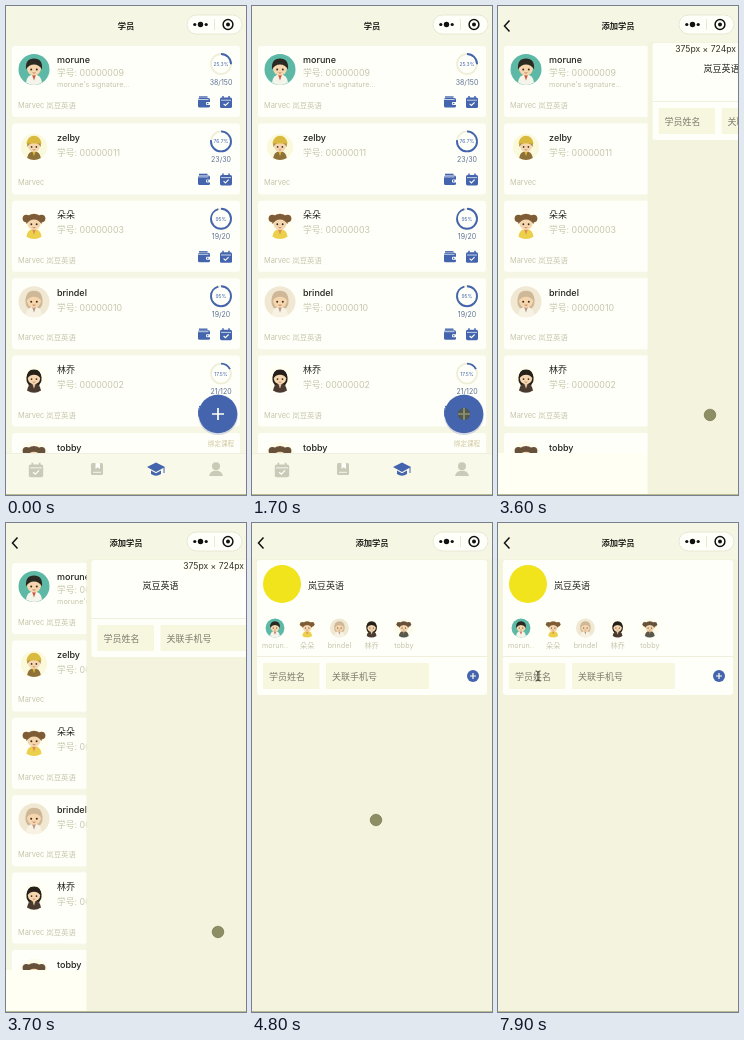
Write an HTML page that moves like this. It is 240 by 489 pixels and loops after 8 s.

```html
<!DOCTYPE html>
<html lang="zh">
<head>
<meta charset="utf-8">
<title>学员</title>
<style>
html, body { margin: 0; width: 100%; height: 100%; overflow: hidden; background: #f6f6e4; }
svg { display: block; width: 100%; height: 100%; }
text { font-family: Inter, "Noto Sans CJK SC", "Noto Sans CJK", sans-serif; dominant-baseline: central; }
</style>
</head>
<body>
<svg id="stage" viewBox="0 0 240 489"></svg>
<script>
const LOOP = 8000, STEP = 100;
const BLUE = '#4465ae', INK = '#24241e', PALE = '#c6c6ac', CARD = '#fffffa', PAGE = '#f6f6e4';
const SCHOOL = '岚豆英语', TUTOR = 'Marvec';

const rect = (x, y, w, h, fill, rx = 0, more = '') =>
  `<rect x="${x}" y="${y}" width="${w}" height="${h}" rx="${rx}" fill="${fill}" ${more}/>`;
const dot = (x, y, r, fill, more = '') => `<circle cx="${x}" cy="${y}" r="${r}" fill="${fill}" ${more}/>`;
const line = (d, stroke, w = 1, more = '') =>
  `<path d="${d}" fill="none" stroke="${stroke}" stroke-width="${w}" ${more}/>`;
const shape = (d, fill) => `<path d="${d}" fill="${fill}"/>`;
const text = (x, y, s, size, fill, more = '') =>
  `<text x="${x}" y="${y}" font-size="${size}" fill="${fill}" ${more}>${s}</text>`;
const mid = 'text-anchor="middle"';
const group = (id, body, more = '') => `<g id="${id}" ${more}>${body}</g>`;
const at = (x, y, body, k = 1) => `<g transform="translate(${x} ${y}) scale(${k})">${body}</g>`;

const students = [
  { name: 'morune', id: 9, pct: 25.3, left: '38/150', school: true, note: true,
    bg: '#5db9a6', hair: '#2b2a22', body: '#f4f4ea', trim: '#d0573c', k: 1 },
  { name: 'zelby', id: 11, pct: 76.7, left: '23/30',
    bg: '#fbf9dc', hair: '#b08a3c', body: '#8d7138', trim: '#d9b93e', k: .85, hat: true },
  { name: '朵朵', id: 3, pct: 95, left: '19/20', school: true,
    bg: '#fffff4', hair: '#7d5c36', body: '#ecd04c', trim: '#d98b5a', k: .95, buns: true },
  { name: 'brindel', id: 10, pct: 95, left: '19/20', school: true,
    bg: '#f0e8d2', hair: '#cfb898', body: '#f8f2e4', trim: '#b99a86', k: 1, long: true },
  { name: '林乔', id: 2, pct: 17.5, left: '21/120', school: true,
    bg: '#fffff4', hair: '#262019', body: '#4b3a30', trim: '#e0c49c', k: .88, long: true },
  { name: 'tobby', bg: '#fdfbea', hair: '#67513a', body: '#55584c', trim: '#c07050', k: .95, buns: true }
];

function avatar(s) {
  return dot(0, 0, 15.5, s.bg) +
    (s.buns ? dot(-8, -6, 4, s.hair) + dot(8, -6, 4, s.hair) : '') +
    (s.long ? rect(-8.5, -9, 17, 17, s.hair, 7) : '') +
    shape('M-8 13Q-7 5 0 5Q7 5 8 13Q0 18 -8 13Z', s.body) +
    shape('M-2 5L0 11L2 5Z', s.trim) +
    dot(0, -1, 7, '#f6d6ae') +
    shape('M-8 0Q-9 -11 0 -11Q9 -11 8 0Q5 -5 0 -5Q-5 -5 -8 0Z', s.hair) +
    (s.hat ? shape('M-9 -4Q-7 -13 0 -13Q7 -13 9 -4Z', s.trim) : '') +
    dot(-2.8, 0, 1, '#38301f') + dot(2.8, 0, 1, '#38301f') +
    line('M-1.4 3.2Q0 4.2 1.4 3.2', '#a85f42', .7);
}

function ring(y, pct) {
  const len = 2 * Math.PI * 10, arc = len * pct / 100;
  return dot(215, y, 10, 'none', 'stroke="#efefd8" stroke-width="1.8"') +
    dot(215, y, 10, 'none', `stroke="${BLUE}" stroke-width="1.9" stroke-dasharray="${arc} ${len}" transform="rotate(-90 215 ${y})"`) +
    text(215, y, pct + '%', 5, BLUE, mid);
}

const wallet = rect(-6, -4, 12, 9.5, BLUE, 1.5) + line('M-5 -5L3.5 -5', BLUE, 1.4) +
  line('M-6 -2.5H4.5', CARD, .7) + rect(2, 0, 4.5, 3, CARD, 1) + dot(3.7, 1.5, .8, BLUE);
const calendar = c => rect(-6, -4.5, 12, 10.5, c, 1.6) + line('M-3 -6V-3M3 -6V-3', c, 1.5) +
  line('M-5 -1.8H5', CARD, .7) + line('M-2.4 1.8L-.6 3.5L2.6 .3', CARD, 1.1);
const plus = (x, y, r, w) => line(`M${x - r} ${y}H${x + r}M${x} ${y - r}V${y + r}`, '#fffff6', w);

function studentCard(s, i) {
  const y = 40 + 77.4 * i, nameY = y + (i ? 14 : 13.5);
  let out = rect(6, y, 228, 71, CARD, 3) + at(28, y + 23.5, avatar(s), s.k) +
    text(51, nameY, s.name, 9, INK, 'font-weight="500"');
  if (!s.id) return out + text(215, y + 11, '绑定课程', 6.6, '#cfc79c', mid);
  out += text(51, y + (s.note ? 26.5 : 29), '学号: ' + String(s.id).padStart(8, '0'), 8.8, PALE) +
    text(12, y + 59.5, s.school ? `${TUTOR} ${SCHOOL}` : TUTOR, 7.4, PALE) +
    ring(y + 18, s.pct) + text(215, y + 36, s.left, 7, '#5d7193', mid) +
    at(198, y + 56, wallet) + at(220, y + 56, calendar(BLUE));
  return s.note ? out + text(51, y + 38.5, s.name + "'s signature...", 7.3, PALE) : out;
}

function tabBar() {
  const c = '#c9cbb8';
  const book = rect(-6, -6, 12, 12, c, 1.5) + shape('M-1.5 -6H3V0L.8 -1.8L-1.5 0Z', CARD) + line('M-4 3.3H4', CARD, .8);
  const cap = shape('M-9 -2L0 -6.5L9 -2L0 3Z', BLUE) + shape('M-5 1.5L0 4.3L5 1.5V5Q0 8.5 -5 5Z', BLUE) + line('M8 -2V4', BLUE);
  const user = dot(0, -2.7, 4, c) + shape('M-7 7Q-6 1.8 0 1.8Q6 1.8 7 7Z', c);
  return rect(0, 447, 240, 42, '#f9f9e9') + line('M0 447.5H240', '#ecece0', .7) +
    at(30, 464, calendar(c), 1.2) + at(91, 463, book) + at(150, 463, cap) + at(210, 463, user);
}

function addPage() {
  const people = students.filter(s => s.name !== 'zelby').map((s, i) => {
    const x = 23 + 32.2 * i, label = i ? s.name : 'morun..';
    return at(x, 105, avatar(s), .61) + text(x, 122.5, label, 7.2, PALE, mid);
  }).join('');
  const form = line('M5 133.5H235', '#efefdc') +
    rect(11, 140, 56.5, 26, '#f7f7df', 1) + text(17, 153, '学员姓名', 9, '#7b7b6c') +
    rect(74, 140, 103, 26, '#f7f7df', 1) + text(80, 153, '关联手机号', 9, '#7b7b6c') +
    dot(221, 153, 6, BLUE) + plus(221, 153, 3, 1.2);
  return rect(0, 36, 240, 453, '#f3f3de') +
    `<rect id="sheet" x="5" y="37" width="230" fill="${CARD}" rx="3"/>` +
    text(56, 62.5, SCHOOL, 9, INK, 'font-weight="500"') +
    group('loaded', dot(30, 61, 19, '#f1e31c') + people) + group('form', form);
}

const capsule = rect(181, 9, 55, 19, '#fffffa', 9.5, 'stroke="#e3e3cf" stroke-width=".8"') +
  dot(188.8, 18.5, 1.6, '#111') + dot(194.5, 18.5, 2.7, '#111') + dot(200.2, 18.5, 1.6, '#111') +
  line('M208.5 13V24', '#e3e3cf', .8) +
  dot(222, 18.5, 4.9, 'none', 'stroke="#111" stroke-width="1.5"') + dot(222, 18.5, 2, '#111');

const stage = document.getElementById('stage');
stage.innerHTML = rect(0, 0, 240, 489, PAGE) +
  students.map(studentCard).join('') +
  rect(0, 447, 240, 42, '#fffff4') +
  dot(212, 409, 20, '#8d9cc0', 'opacity=".35"') + dot(212, 408, 19.3, BLUE) + plus(212, 408, 6, 1.7) +
  group('tabs', tabBar()) +
  group('add', addPage()) +
  rect(0, 0, 240, 36, PAGE) +
  `<text id="title" x="120" y="20" font-size="8.3" font-weight="600" fill="${INK}" ${mid}></text>` +
  group('back', line('M11.5 14.5L6.5 20L11.5 25.5', '#111', 1.5)) + capsule +
  group('size', rect(174, 37, 66, 12, '#fffff6', 0, 'opacity=".8"') + text(238, 43, '375px × 724px', 8.6, '#33332a', 'text-anchor="end"')) +
  rect(0, 488, 240, 1, '#b9b992') +
  group('touch', dot(0, 0, 5.8, '#55551f', 'fill-opacity=".64" stroke="#4c4c28" stroke-opacity=".55" stroke-width=".8"')) +
  group('beam', line('M-2.5 -5Q0 -5 0 -3.5Q0 -5 2.5 -5M0 -4V4M-2.5 5Q0 5 0 3.5Q0 5 2.5 5', '#333327', 1));

const el = id => document.getElementById(id);
const show = (id, on) => el(id).setAttribute('display', on ? 'inline' : 'none');
const move = (id, x, y) => el(id).setAttribute('transform', `translate(${x} ${y})`);

// Pointer stops: time, x, y
const path = [[1000, 244, -8], [1600, 212, 408], [4000, 212, 409], [4700, 124, 297],
  [5200, 124, 297], [6000, 116, 294], [6700, 116, 294], [7500, 40, 153]];

function pointer(t) {
  const i = path.findIndex(p => p[0] > t);
  if (i === 0) return path[0].slice(1);
  if (i < 0) return path[path.length - 1].slice(1);
  const [t0, x0, y0] = path[i - 1], [t1, x1, y1] = path[i];
  const p = (t - t0) / (t1 - t0), e = p * p * (3 - 2 * p);
  return [x0 + (x1 - x0) * e, y0 + (y1 - y0) * e];
}

function draw(t) {
  const adding = t >= 3100, loaded = t >= 4100;
  el('title').textContent = adding ? '添加学员' : '学员';
  show('back', adding);
  show('tabs', !adding);

  const p = Math.min(1, Math.max(0, (t - 3500) / 475));
  show('add', p > 0);
  move('add', 240 * (1 - p) ** 2, 0);
  show('loaded', loaded);
  move('form', 0, loaded ? 0 : -38);
  el('sheet').setAttribute('height', loaded ? 135 : 97);
  show('size', t >= 3400 && t < 4400);

  const [x, y] = pointer(t);
  const typing = t > 7000 && x > 11 && x < 67 && y > 140 && y < 166;
  show('touch', !typing);
  show('beam', typing);
  move('touch', x, y);
  move('beam', x, y);
}

function tick() {
  draw(Math.floor(performance.now() % LOOP / STEP) * STEP);
  requestAnimationFrame(tick);
}
tick();
</script>
</body>
</html>
```
